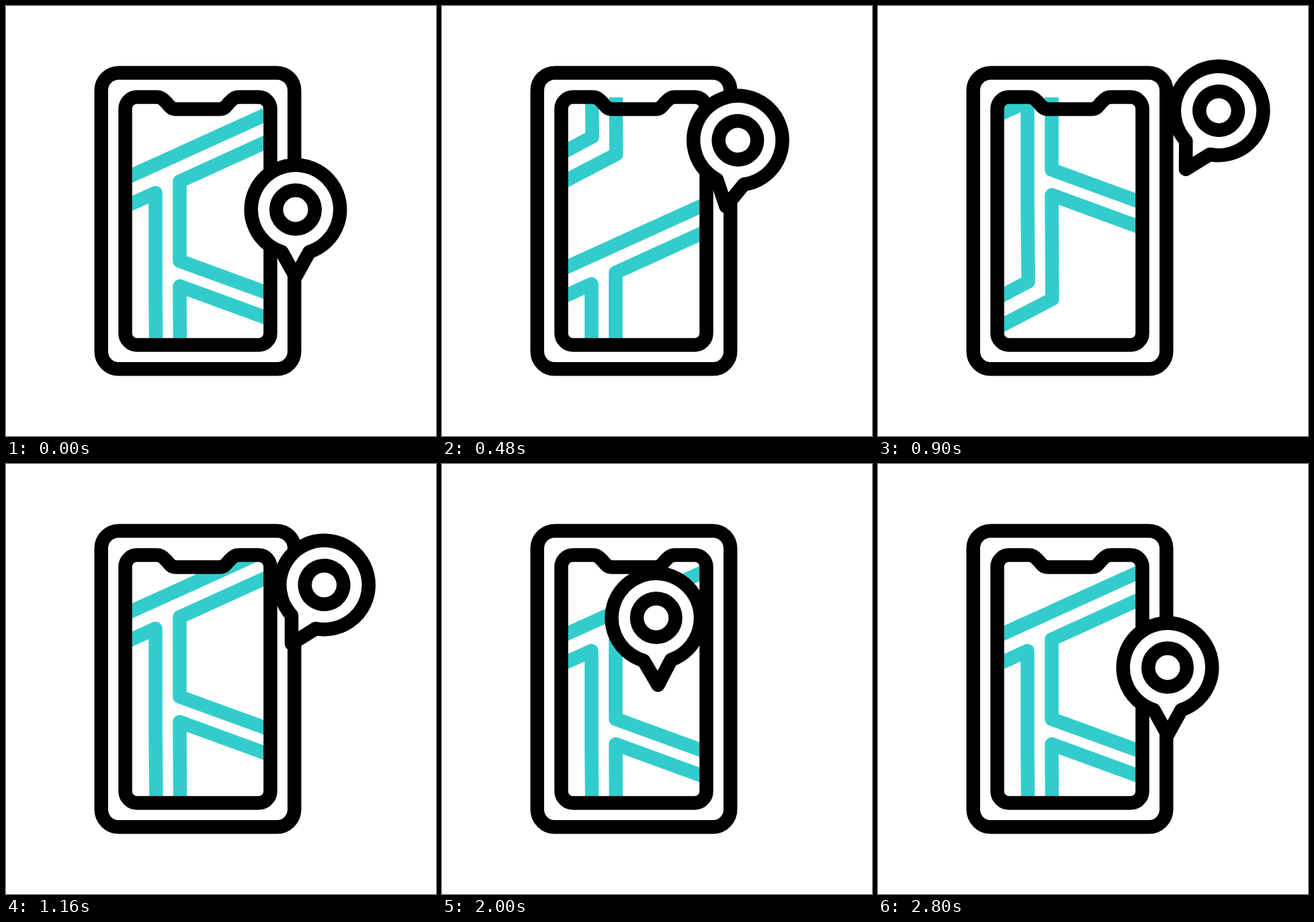
Animation of 640 by 640 pixels, one loop 3.6 s. Source, as an HTML page:

```html
<!DOCTYPE html>
<html lang="en">
<head>
<meta charset="utf-8">
<title>Map navigation</title>
<style>
  html, body { margin: 0; width: 100%; height: 100%; overflow: hidden; background: #fff; }
  svg { display: block; width: 100%; height: 100%; }
  path, rect, circle { fill: none; stroke: #000; stroke-width: 20.5; stroke-linejoin: round; }
  #roads path { stroke: #33cccc; }
  #pin path { fill: #fff; }
</style>
</head>
<body>
<svg viewBox="0 0 640 640">
  <defs>
    <clipPath id="screen"><rect x="178" y="136" width="216" height="368" rx="17"/></clipPath>
    <g id="roads">
      <path d="M150 269L420 146.5"/>
      <path d="M420 187.5L258.5 261V379.5L420 438.3"/>
      <path d="M420 476L258.5 417L259.3 572L150 629"/>
      <path d="M150 311L222.5 278V430L223.7 546L150 585"/>
    </g>
  </defs>

  <rect x="141.75" y="99.5" width="287.5" height="440.8" rx="26"/>
  <g clip-path="url(#screen)">
    <g id="map">
      <use href="#roads"/>
      <use href="#roads" y="-487"/>
    </g>
  </g>
  <path d="M195 135.5H224C231 135.5 234 139 238 143C242 147 245 153.5 253 153.5
           H318C326 153.5 329 147 333 143C337 139 340 135.5 347 135.5H376
           A17.5 17.5 0 0 1 393.5 153V487A17.5 17.5 0 0 1 376 504.5
           H195A17.5 17.5 0 0 1 177.5 487V153A17.5 17.5 0 0 1 195 135.5Z"/>

  <!-- the pin's tip is its local zero point -->
  <g id="pin">
    <path d="M0 0L-20.5 -37A66.25 66.25 0 1 1 20.5 -37Z"/>
    <circle cy="-100" r="28.75"/>
  </g>
</svg>
<script>
  const LOOP = 3600, STEP = 20, PERIOD = 487;
  const map = document.getElementById('map');
  const pin = document.getElementById('pin');

  // eased progress between two times
  const ease = (t, from, to) => {
    const u = Math.min(1, Math.max(0, (t - from) / (to - from)));
    return u * u * (3 - 2 * u);
  };

  // point on a Bezier curve of any degree
  const bezier = (pts, u) => {
    while (pts.length > 1)
      pts = pts.slice(1).map((p, i) => p.map((v, k) => pts[i][k] + (v - pts[i][k]) * u));
    return pts[0];
  };

  const HOME = [431, 403], TURN = [458, 243], SPOT = [321.5, 329];
  const rise = [HOME, [400, 348], [428, 243], TURN];
  const cross = [TURN, [389.75, 296], SPOT];
  const back = [SPOT, HOME];

  function tipAt(t) {
    if (t < 1000) return bezier(rise, ease(t, 96, 843));
    if (t < 2000) return bezier(cross, ease(t, 1000, 1500));
    return bezier(back, ease(t, 2155, 2800));
  }

  const tiltAt = t =>
    32 * ease(t, 123, 1065) - 47 * ease(t, 1095, 1520) + 15 * ease(t, 1520, 2120);

  function draw(now) {
    const t = Math.floor((now % LOOP) / STEP) * STEP;
    const [x, y] = tipAt(t);
    map.setAttribute('transform', `translate(0 ${PERIOD * ease(t, 0, 1380) % PERIOD})`);
    pin.setAttribute('transform', `translate(${x} ${y}) rotate(${tiltAt(t)})`);
  }

  let start;
  function tick(now) {
    start ??= now;
    draw(now - start);
    requestAnimationFrame(tick);
  }
  draw(0);
  requestAnimationFrame(tick);
</script>
</body>
</html>
```
